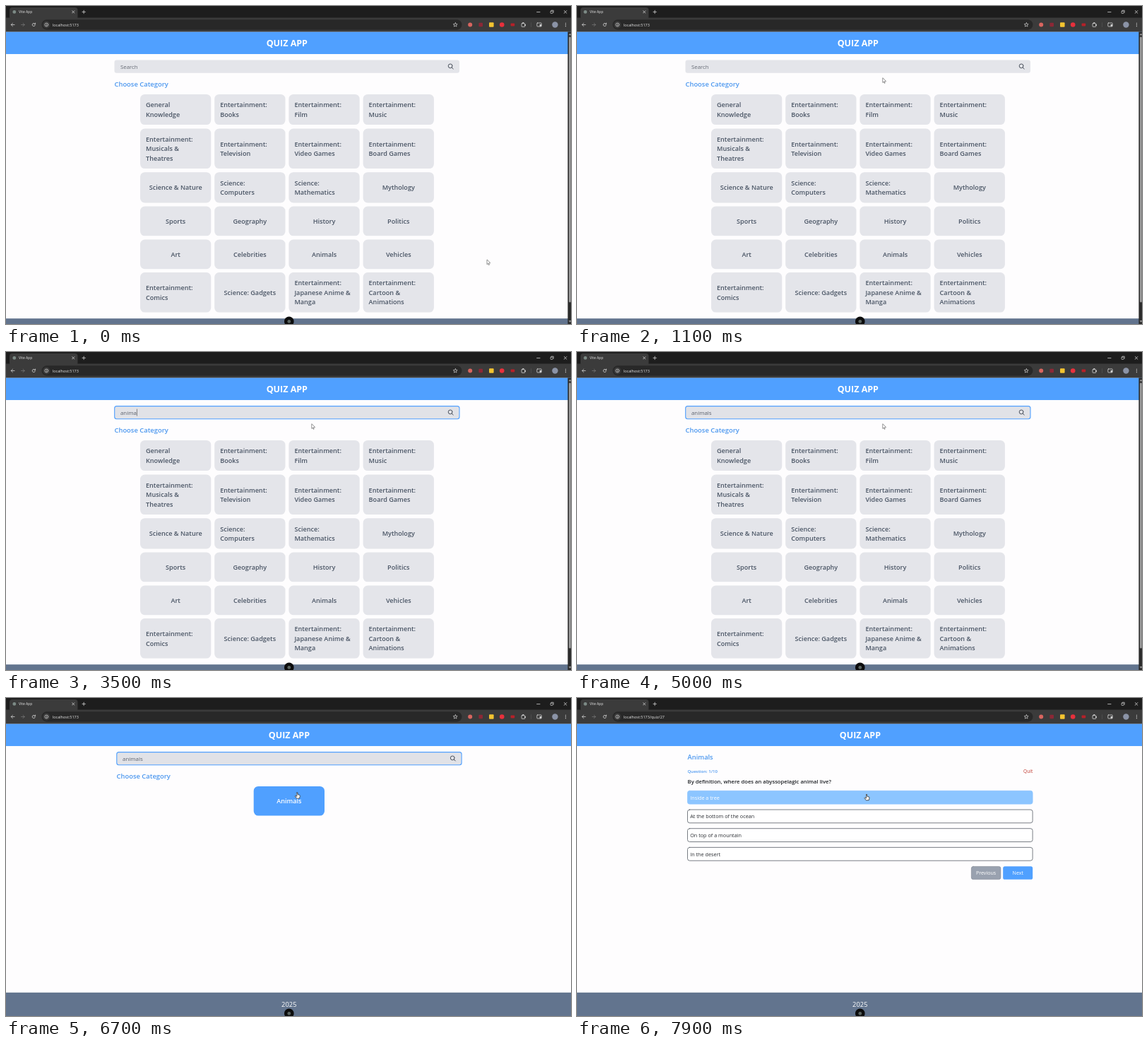
These frames come from a looping animation (800x450 px, 8 s). An HTML page with a canvas:

```html
<!DOCTYPE html>
<html lang="en">
<head>
<meta charset="utf-8">
<title>Quiz App</title>
<style>
  html, body { margin: 0; width: 100%; height: 100%; overflow: hidden; background: #fefefe; }
  canvas { display: block; width: 800px; height: 450px; }
</style>
</head>
<body>
<canvas id="stage"></canvas>
<script>
const LOOP = 8000;
const BLUE = '#50a0ff', LINK = '#4b97ef', SLATE = '#62748e';
const CARD = '#e4e5ea', INK = '#4a5565', PAGE = '#fefdfe';
const FONT = '"Open Sans", "Noto Sans", sans-serif';

const canvas = document.getElementById('stage');
const ctx = canvas.getContext('2d');
const dpr = window.devicePixelRatio || 1;
canvas.width = 800 * dpr;
canvas.height = 450 * dpr;

// ---------- helpers ----------
function rect(x, y, w, h, fill) {
  ctx.fillStyle = fill;
  ctx.fillRect(x, y, w, h);
}

function box(x, y, w, h, r, fill, stroke, line = 0.8) {
  ctx.beginPath();
  ctx.roundRect(x, y, w, h, r);
  if (fill) { ctx.fillStyle = fill; ctx.fill(); }
  if (stroke) { ctx.strokeStyle = stroke; ctx.lineWidth = line; ctx.stroke(); }
}

function disc(x, y, r, fill) {
  ctx.beginPath();
  ctx.arc(x, y, r, 0, Math.PI * 2);
  ctx.fillStyle = fill;
  ctx.fill();
}

function ring(x, y, r, color, line = 0.8, from = 0, to = Math.PI * 2) {
  ctx.beginPath();
  ctx.arc(x, y, r, from, to);
  ctx.strokeStyle = color;
  ctx.lineWidth = line;
  ctx.stroke();
}

function path(points, color, line = 0.8) {
  ctx.beginPath();
  points.forEach(([x, y]) => ctx.lineTo(x, y));
  ctx.strokeStyle = color;
  ctx.lineWidth = line;
  ctx.stroke();
}

// y is the middle of the capitals
function text(str, x, y, size, color, weight = 400, align = 'left') {
  ctx.font = `${weight} ${size}px ${FONT}`;
  ctx.textAlign = align;
  ctx.fillStyle = color;
  ctx.fillText(str, x, y + size * 0.357);
}

const clamp = v => Math.min(1, Math.max(0, v));
const ease = v => v * v * (3 - 2 * v);

// ---------- pointer ----------
const stops = [
  [300, 681, 359], [1100, 432.8, 101.8], [6400, 432.8, 101.8],
  [6700, 412.3, 133.6], [7200, 410, 136.2], [LOOP, 410, 136.2]
];

function pointerAt(t) {
  let a = stops[0];
  for (const b of stops) {
    if (t < b[0]) {
      if (a === b) break;
      const k = ease(clamp((t - a[0]) / (b[0] - a[0])));
      return { x: a[1] + (b[1] - a[1]) * k, y: a[2] + (b[2] - a[2]) * k };
    }
    a = b;
  }
  return { x: a[1], y: a[2] };
}

const inside = (p, x, y, w, h) => p.x >= x && p.x <= x + w && p.y >= y && p.y <= y + h;

function shape(points, x, y, fill, stroke) {
  ctx.beginPath();
  points.forEach(([px, py]) => ctx.lineTo(x + px, y + py));
  ctx.closePath();
  ctx.lineJoin = 'round';
  ctx.strokeStyle = stroke;
  ctx.lineWidth = 0.8;
  ctx.fillStyle = fill;
  ctx.fill();
  ctx.stroke();
}

function drawPointer(p, hand) {
  if (hand) {
    shape([[-0.7, 0.3], [0.7, 0.3], [0.8, 3], [3.6, 3.8], [4, 5], [3.3, 8.4],
      [-0.6, 8.6], [-3, 5.4], [-2.4, 4.6], [-0.8, 5.6]], p.x, p.y, '#fff', '#333');
  } else {
    shape([[0, 0], [0, 6.6], [1.5, 5.3], [2.5, 7.6], [3.4, 7.2], [2.5, 5], [4.4, 4.8]],
      p.x, p.y, '#fff', '#777');
  }
}

// ---------- browser window ----------
function drawBrowser(url) {
  const pale = '#d2d2d2', dim = '#777';
  rect(0, 0, 800, 17, '#1d1d1d');
  rect(0, 16.5, 800, 20, '#3b3b3b');
  box(5, 2, 96.5, 17, 4, '#3b3b3b');
  disc(11.8, 8.4, 2.4, '#7d8b86');
  text('Vite App', 18, 8.6, 4.95, '#e4e4e4');
  const cross = (x, y, r) => {
    path([[x - r, y - r], [x + r, y + r]], pale);
    path([[x - r, y + r], [x + r, y - r]], pale);
  };
  cross(95.3, 8.4, 1.6);
  path([[107.8, 8.4], [112.4, 8.4]], pale);
  path([[110.1, 6.1], [110.1, 10.7]], pale);
  path([[751.5, 8.6], [756, 8.6]], pale);
  box(771, 7.2, 3.2, 3.2, 0.5, null, pale, 0.7);
  path([[772.2, 6.2], [775.2, 6.2], [775.2, 9.2]], pale, 0.7);
  cross(792, 8.4, 1.9);

  path([[12, 26.5], [7.3, 26.5]], pale);
  path([[9.4, 24.3], [7.2, 26.5], [9.4, 28.7]], pale);
  path([[21.5, 26.5], [26.2, 26.5]], dim);
  path([[24, 24.3], [26.2, 26.5], [24, 28.7]], dim);
  ring(39.3, 26.5, 2.1, pale, 0.8, 0.3, 5.6);
  path([[41.6, 23.9], [41.6, 25.7], [39.8, 25.7]], pale);

  box(50.5, 19.3, 595, 14.4, 7.2, '#282828');
  disc(57.3, 26.5, 5, '#3b3b3b');
  ring(57.3, 26.5, 2.4, pale, 0.7);
  path([[57.3, 26.2], [57.3, 27.9]], pale, 0.7);
  rect(56.9, 24.9, 0.8, 0.7, pale);
  text(url, 65.8, 26.6, 5.5, '#e6e6e6');

  ctx.beginPath();
  for (let i = 0; i < 10; i++) {
    const a = i * Math.PI / 5 - Math.PI / 2, r = i % 2 ? 1.4 : 3.1;
    ctx.lineTo(636.2 + r * Math.cos(a), 26.6 + r * Math.sin(a));
  }
  ctx.closePath();
  ctx.strokeStyle = pale;
  ctx.lineWidth = 0.7;
  ctx.stroke();

  disc(657.2, 26.5, 3, '#d8655f');
  box(669.4, 23.7, 5.6, 5.6, 1, '#8c2836');
  box(684, 23.2, 6.6, 6.6, 1, '#f3c430');
  disc(702.2, 26.5, 3.3, '#e8303c');
  box(714.6, 24.6, 5.6, 3.8, 1, '#b52129');
  box(730, 24.6, 4.8, 4.8, 0.7, null, pale);
  disc(732.3, 24, 1.1, pale);
  disc(735, 27, 1.1, pale);
  path([[743.5, 23.5], [743.5, 29.5]], '#5a5a5a', 0.6);
  box(751.8, 24, 6.4, 5, 0.7, null, pale);
  rect(755.6, 26, 2.4, 2.8, pale);
  disc(777.4, 26.5, 4.2, '#8b93a6');
  [24.3, 26.5, 28.7].forEach(y => disc(792.4, y, 0.65, pale));
}

// ---------- page parts ----------
function drawHeader(dx) {
  rect(0, 36.4, 800, 31.6, BLUE);
  text('QUIZ APP', 397.8 + dx, 53, 12.5, '#fff', 700, 'center');
}

function drawBadge() {
  disc(400.8, 446.4, 6.8, '#0c0c0c');
  disc(400.8, 446.4, 2.4, '#5a6460');
}

function drawFooter() {
  rect(0, 416.8, 800, 33.2, SLATE);
  text('2025', 400.8, 434, 9.4, '#fff', 400, 'center');
}

const keys = [[2400, 'a'], [2700, 'n'], [3000, 'i'], [3200, 'm'], [3400, 'a'], [3900, 'l'], [4100, 's']];

function drawSearch(t, dx) {
  const focus = clamp((t - 1200) / 200);
  const x = 153.5 + dx;
  const typed = keys.filter(k => t >= k[0]).map(k => k[1]).join('');
  box(x, 76.4, 488.5, 18.4, 3, CARD);
  if (focus > 0) {
    ctx.globalAlpha = focus;
    box(x + 0.2, 76.6, 488.3, 18.1, 3, '#e1e2e7', BLUE, 1.1);
    ctx.globalAlpha = 1;
  }
  text(typed || 'Search', x + 8.4, 86, 7.9, typed ? '#5c626d' : '#666b75');

  // the caret restarts its blink at every key
  const last = keys.reduce((m, k) => t >= k[0] ? k[0] : m, 1500);
  if (t >= 1500 && t < 7200 && (t - last) % 1000 < 500) {
    const w = typed ? ctx.measureText(typed).width : 0;
    rect(x + 8.5 + w, 80.6, 0.6, 10, '#444');
  }
  ring(x + 475.6, 84.9, 2.9, '#3d4450', 0.9);
  path([[x + 477.7, 87], [x + 479.7, 89]], '#3d4450', 1);
  text('Choose Category', x, 110.6, 9.4, LINK, 600);
}

function drawCard(label, x, y, w, h, p) {
  const hot = inside(p, x, y, w, h);
  const color = hot ? '#fff' : INK;
  const lines = label.split('|');
  box(x, y, w, h, 6.5, hot ? BLUE : CARD);
  lines.forEach((line, i) => {
    const cy = y + h / 2 + 0.3 + (i - (lines.length - 1) / 2) * 13.5;
    if (lines.length > 1) text(line, x + 8, cy, 9.1, color, 600);
    else text(line, x + w / 2, cy, 9.1, color, 600, 'center');
  });
  return hot;
}

const rows = [
  [124.9, 43.2, ['General|Knowledge', 'Entertainment:|Books', 'Entertainment:|Film', 'Entertainment:|Music']],
  [173.5, 56.6, ['Entertainment:|Musicals &|Theatres', 'Entertainment:|Television', 'Entertainment:|Video Games', 'Entertainment:|Board Games']],
  [235.2, 43.2, ['Science & Nature', 'Science:|Computers', 'Science:|Mathematics', 'Mythology']],
  [283.6, 41.7, ['Sports', 'Geography', 'History', 'Politics']],
  [330.5, 41.7, ['Art', 'Celebrities', 'Animals', 'Vehicles']],
  [377, 56.6, ['Entertainment:|Comics', 'Science: Gadgets', 'Entertainment:|Japanese Anime &|Manga', 'Entertainment:|Cartoon &|Animations']]
];

function drawScrollbar() {
  rect(795.4, 36.4, 4.6, 413.6, '#2b2b2b');
  box(797, 43.5, 2.8, 376, 1.4, '#9b9b9b');
  shape([[0, 0], [-1.2, 1.8], [1.2, 1.8]], 798.4, 39.2, '#9b9b9b', '#9b9b9b');
  shape([[0, 0], [-1.2, -1.8], [1.2, -1.8]], 798.4, 447.2, '#9b9b9b', '#9b9b9b');
}

function drawHome(t, p) {
  let hot = false;
  drawHeader(0);
  drawSearch(t, 0);
  for (const [y, h, labels] of rows) {
    labels.forEach((label, i) => {
      if (drawCard(label, 190 + i * 105.2, y, 100.3, h, p)) hot = true;
    });
  }
  rect(0, 442.2, 800, 7.8, SLATE);
  drawScrollbar();
  return hot;
}

function drawResults(t, p) {
  drawHeader(3.1);
  drawSearch(t, 3.1);
  drawFooter();
  if (t < 5900) {
    text('Loading...', 156.5, 121.8, 6.4, '#3f4550');
    return false;
  }
  return drawCard('Animals', 350.7, 124.9, 100.3, 41.7, p);
}

function drawQuiz(p) {
  let hot = false;
  drawHeader(3.1);
  drawFooter();
  text('Animals', 156.6, 84, 9.3, LINK, 600);
  text('Question: 1/10', 156.6, 103.5, 6, LINK, 600);
  text('Quit', 645.3, 103.5, 6.6, '#c0392f', 400, 'right');
  text('By definition, where does an abyssopelagic animal live?', 156.6, 118, 7.65, '#1f2226', 600);
  ['Inside a tree', 'At the bottom of the ocean', 'On top of a mountain', 'In the desert'].forEach((answer, i) => {
    const y = 131.3 + i * 26.7;
    const over = inside(p, 156.4, y, 488.8, 19);
    hot = hot || over;
    box(156.5, y, 488.6, 18.8, 3, over ? '#8cc5ff' : '#fff', over ? '#8cc5ff' : '#4d535c', 0.75);
    text(answer, 160.2, y + 9.9, 7.25, over ? '#fff' : '#2a2d32');
  });
  box(558.4, 238.4, 41.5, 18.2, 2.6, '#99a1af', '#858c99', 0.7);
  text('Previous', 579.1, 247.8, 7.1, '#fff', 400, 'center');
  box(603.2, 238.2, 42, 18.6, 2.6, BLUE);
  text('Next', 624.3, 247.8, 7.1, '#fff', 400, 'center');
  return hot;
}

// ---------- loop ----------
function draw(t) {
  const p = pointerAt(t);
  const quiz = t >= 7300;
  ctx.setTransform(dpr, 0, 0, dpr, 0, 0);
  ctx.lineCap = 'round';
  rect(0, 0, 800, 450, PAGE);
  const hot = quiz ? drawQuiz(p) : t >= 5100 ? drawResults(t, p) : drawHome(t, p);
  drawBadge();
  drawBrowser('localhost:5173' + (quiz ? '/quiz/27' : ''));
  drawPointer(p, hot);
}

const start = performance.now();
function tick() {
  draw((performance.now() - start) % LOOP);
  requestAnimationFrame(tick);
}
tick();
</script>
</body>
</html>
```
